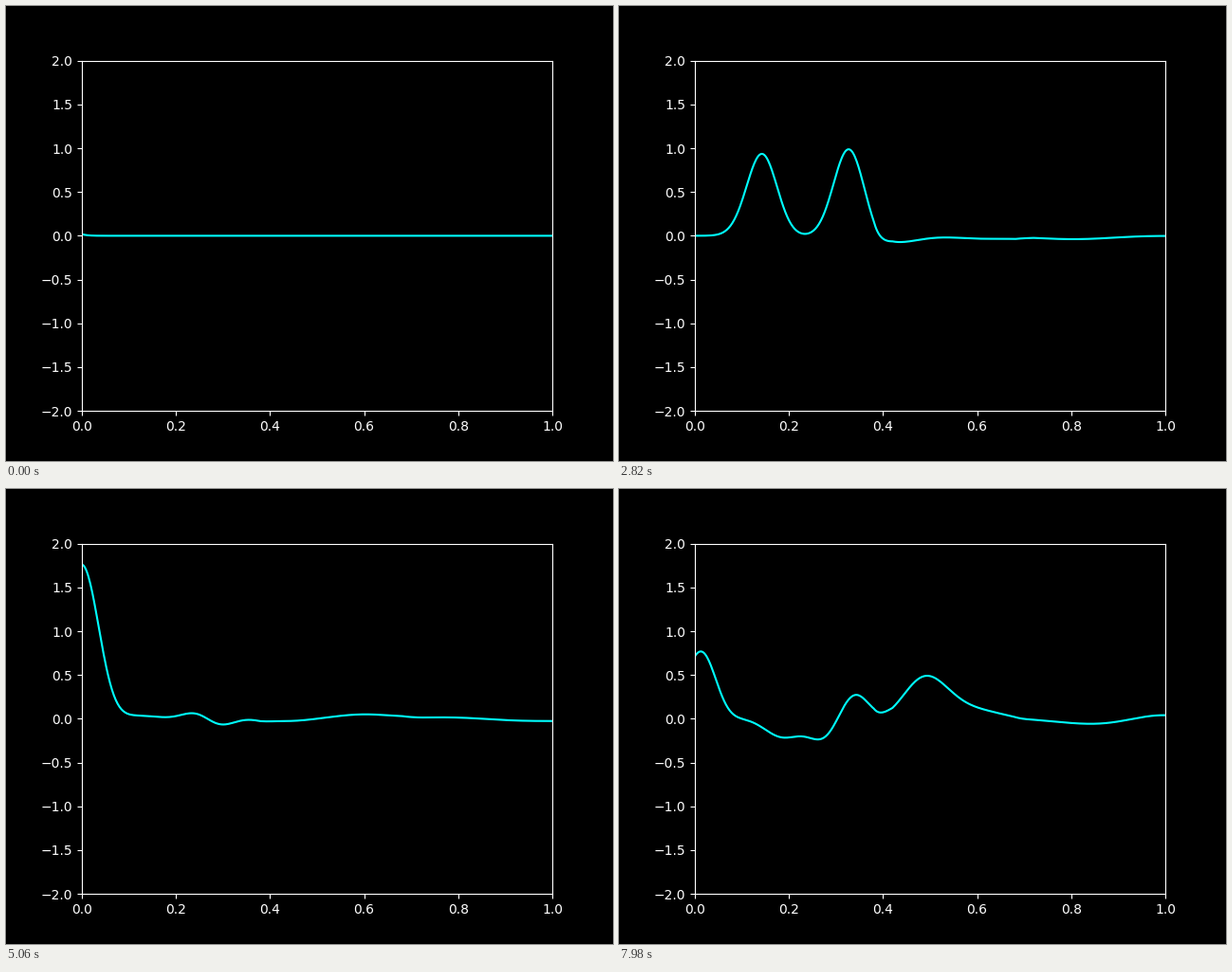
Recreate the animation shown at these times as a matplotlib script. Size 640 by 480 pixels, loop 8000 ms.

```python
import numpy as np
import matplotlib.pyplot as plt
from matplotlib.animation import FuncAnimation

FRAMES, INTERVAL = 400, 20
SUBSTEPS = 16
DX = 0.002
DT = INTERVAL / 1000 / SUBSTEPS
PULSE_TIME, PULSE_WIDTH = 0.184, 0.092
WARMUP = 10

x = np.arange(-247, 499) * DX
origin = 247
# Three media with short linear transitions in wave speed
speed = np.interp(x, [0.38, 0.42, 0.68, 0.72], [0.5, 0.75, 0.75, 1.125])
c2 = speed ** 2


def drive(t):
    """Time derivative of the Gaussian pulse sent out from x = 0."""
    s = (t - PULSE_TIME) / PULSE_WIDTH
    return -2 * s / PULSE_WIDTH * np.exp(-s * s)


def step(u, prev, t):
    """Advance u_tt = (c^2 u)_xx with reflecting ends."""
    p = np.empty(u.size + 2)
    p[1:-1] = c2 * u
    p[0], p[-1] = p[1], p[-2]
    new = 2 * u - prev + (DT / DX) ** 2 * (p[2:] - 2 * p[1:-1] + p[:-2])
    new[origin] += DT ** 2 / DX * 2 * speed[origin] * drive(t)
    return new, u


def simulate(grid):
    u = np.zeros_like(x)
    prev = u.copy()
    rows = []
    for frame in range(-WARMUP, FRAMES):
        if frame >= 0:
            rows.append(np.interp(grid, x, u))
        for k in range(SUBSTEPS):
            u, prev = step(u, prev, (frame * SUBSTEPS + k) * DT)
    return rows


grid = np.linspace(0, 1, 501)
waves = simulate(grid)

plt.style.use("dark_background")
plt.rcParams["font.family"] = "DejaVu Sans"
fig, ax = plt.subplots(figsize=(6.4, 4.8), dpi=100)
ax.set_xlim(0, 1)
ax.set_ylim(-2, 2)
line, = ax.plot(grid, waves[0], color="cyan", lw=1.5)


def update(frame):
    line.set_ydata(waves[frame])
    return line,


anim = FuncAnimation(fig, update, frames=FRAMES, interval=INTERVAL,
                     repeat=True, repeat_delay=0, blit=False)
plt.show()
```
